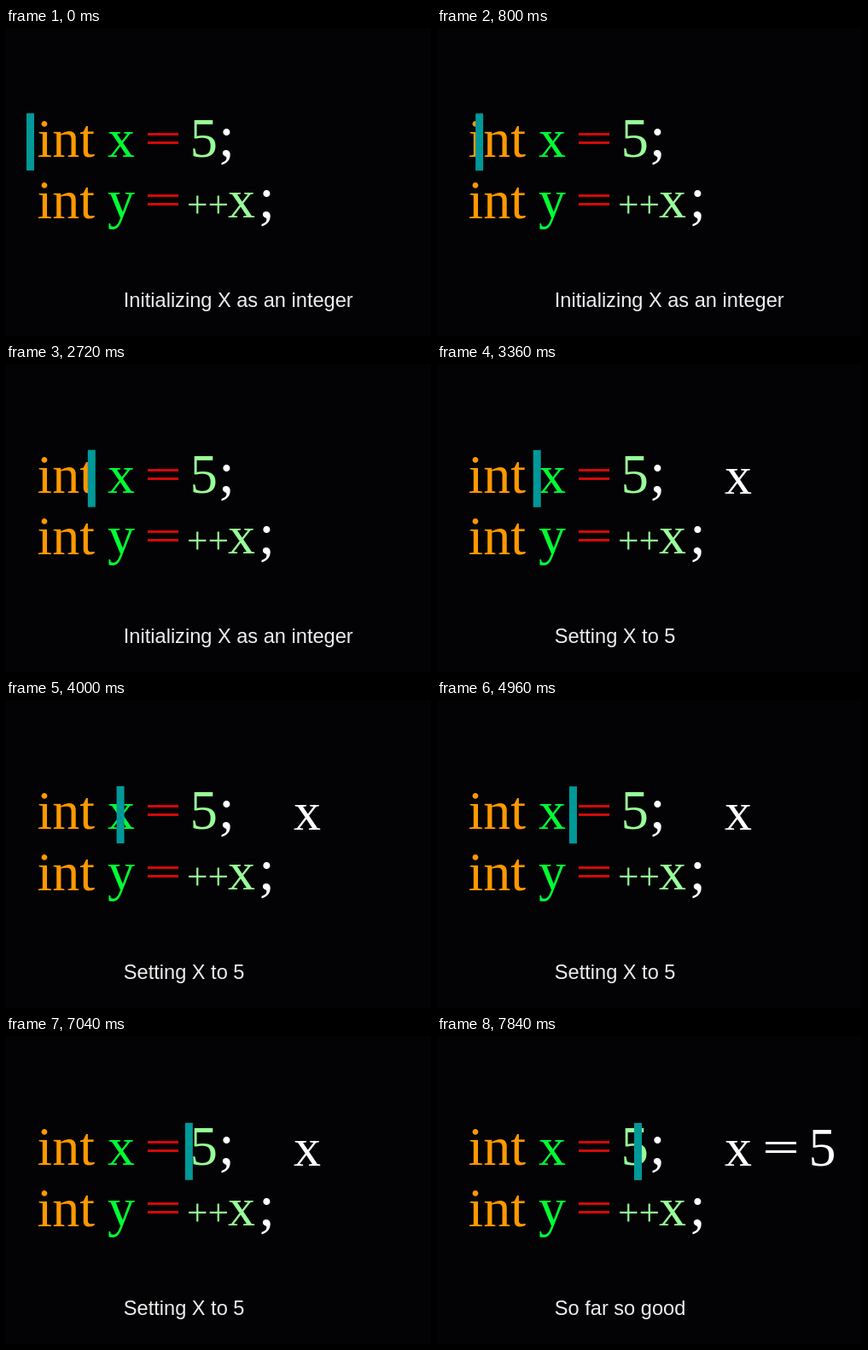
Recreate the animation shown at these times as an HTML page with a canvas. Size 498x361 px, loop 8 s.

```html
<!DOCTYPE html>
<html lang="en">
<head>
<meta charset="utf-8">
<title>Pre-increment walkthrough</title>
<style>
html, body { margin: 0; width: 100%; height: 100%; overflow: hidden; background: #030204; }
canvas { display: block; }
</style>
</head>
<body>
<canvas id="stage" width="498" height="361"></canvas>
<script>
const ctx = document.getElementById('stage').getContext('2d');
const LOOP = 8000, STEP = 160;
const SERIF = '"Liberation Serif", "Times New Roman", serif';
const SANS = '"Liberation Sans", Arial, sans-serif';
const ORANGE = '#ff9900', GREEN = '#00ff33', RED = '#d40808';
const MINT = '#98ff98', WHITE = '#fff', TEAL = '#009898';

// text, x, baseline, colour, size
const code = [
  ['int', 36.5, 150.5, ORANGE, 64],
  ['x', 119, 150.5, GREEN, 64],
  ['5', 215.5, 151, MINT, 65],
  [';', 249, 150, WHITE, 68],
  ['int', 36.5, 222.5, ORANGE, 64],
  ['y', 119, 222, GREEN, 64],
  ['++', 212, 222, MINT, 43.5],
  ['x', 260, 222, MINT, 64],
  [';', 296, 221.5, WHITE, 68]
];

// start time, caption
const captions = [
  [0, 'Initializing X as an integer'],
  [3040, 'Setting X to 5'],
  [7200, 'So far so good']
];

function write(text, x, y, color, size, family = SERIF) {
  ctx.font = `${size}px ${family}`;
  ctx.fillStyle = color;
  ctx.fillText(text, x, y);
}

// a wide equals sign whose bars sit closer than the font's
function equals(x, baseline, color) {
  ctx.fillStyle = color;
  for (const rise of [28, 18]) ctx.fillRect(x, baseline - rise, 36, 3);
}

function draw(time) {
  const step = Math.floor((time % LOOP) / STEP);
  const stage = captions.findLastIndex(c => c[0] <= step * STEP);

  ctx.fillStyle = '#030204';
  ctx.fillRect(0, 0, 498, 361);
  for (const token of code) write(...token);
  equals(166, 151, RED);
  equals(166, 223, RED);

  if (stage > 0) write('x', 337, 151.5, WHITE, 64);
  if (stage > 1) {
    equals(385, 152, WHITE);
    write('5', 435.5, 151.5, WHITE, 64);
  }
  write(captions[stage][1], 137.8, 327, '#eee', 23.6, SANS);

  // the cursor glides right and sinks very slightly
  ctx.fillStyle = TEAL;
  ctx.fillRect(24 + 4.224 * step, 100 + 0.04 * step, 9, 67);
}

const start = performance.now();
function tick() {
  draw(performance.now() - start);
  requestAnimationFrame(tick);
}
tick();
</script>
</body>
</html>
```
